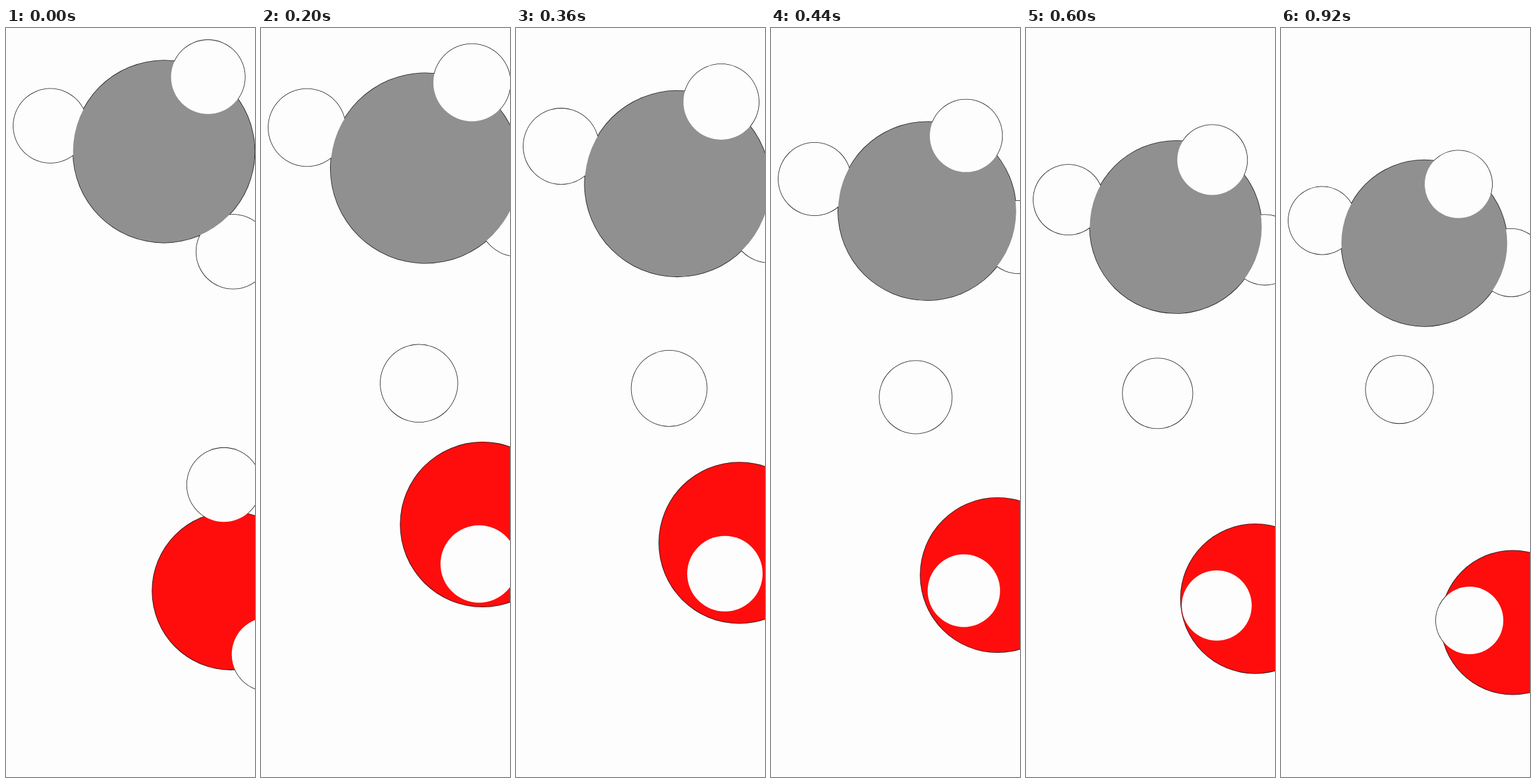
Recreate the animation shown at these times as an HTML page. Size 400 px wide and 1200 px high, loop 960 ms.

```html
<!DOCTYPE html>
<html lang="en">
<head>
<meta charset="utf-8">
<title>Drifting circles</title>
<style>
  html, body { margin: 0; width: 100%; height: 100%; overflow: hidden; background: #fdfdfd; }
  svg { display: block; width: 100%; height: 100%; }
</style>
</head>
<body>
<svg viewBox="0 0 400 1200"><g id="rims"></g><g id="discs"></g></svg>
<script>
const LOOP = 960, STEP = 40, LINE = 0.8;
const WHITE = '#fdfdfd', GREY = '#909090', RED = '#ff0d0d', INK = '#111';

// The whole group is zoomed to span these two edges; the right one is off stage.
const LEFT = 11.5, RIGHT = 488;
const GREY_SIZE = 2.449, RED_SIZE = 2.121;

const easeIn = u => u ** 2.5;
const easeOut = u => 1 - (1 - u) ** 1.7;

// Approach, slow release, drift to rest.
const phases = [
  { from: 0, to: 200, ease: easeOut },
  { from: 200, to: 440, ease: easeIn },
  { from: 440, to: 920, ease: easeOut }
];

// Centres at the four phase ends.
const red = {
  fill: RED, size: RED_SIZE,
  x: [361.3, 355.8, 363.8, 372.3], y: [901.8, 795.4, 876.5, 952.5]
};
const leftmost = { fill: WHITE, size: 1, y: [156.7, 159.5, 242, 308.5] };

// Back to front.
const circles = [
  leftmost,
  { fill: WHITE, size: 1, x: [365, 412, 398, 369.5], y: [358.4, 304, 335, 376] },
  { fill: GREY, size: GREY_SIZE, x: [253.6, 264, 250.8, 230.2], y: [198, 224.5, 293.3, 344.7] },
  { fill: WHITE, size: 1, x: [324.5, 338.8, 313.3, 285], y: [78.5, 87.5, 172.7, 250.4] },
  red,
  { fill: WHITE, size: 1, x: [350, 253.8, 232.4, 190.3], y: [732, 569.3, 591.5, 579.2] },
  { fill: WHITE, size: 1, x: [422, 350.3, 309.8, 303], y: [1003.5, 858.7, 901.5, 949.2] }
];

function addCircle(groupId, fill) {
  const node = document.createElementNS('http://www.w3.org/2000/svg', 'circle');
  node.setAttribute('fill', fill);
  return document.getElementById(groupId).appendChild(node);
}

function place(node, x, y, r) {
  node.setAttribute('cx', x);
  node.setAttribute('cy', y);
  node.setAttribute('r', r);
}

// Rims lie below every disc, so lines show only around the merged shape.
for (const c of circles) {
  c.rim = addCircle('rims', INK);
  c.disc = addCircle('discs', c.fill);
}

function draw(now) {
  const t = Math.floor((now % LOOP) / STEP) * STEP;
  const i = phases.findIndex(p => t <= p.to);
  const { from, to, ease } = phases[i];
  const part = ease((t - from) / (to - from));
  const mix = track => track[i] + (track[i + 1] - track[i]) * part;

  const unit = (RIGHT - mix(red.x)) / RED_SIZE;
  for (const c of circles) {
    const x = c === leftmost ? LEFT + unit : mix(c.x);
    const y = mix(c.y), r = unit * c.size;
    place(c.rim, x, y, r + LINE / 2);
    place(c.disc, x, y, r - LINE / 2);
  }
}

const start = performance.now();
function tick() {
  draw(performance.now() - start);
  requestAnimationFrame(tick);
}
tick();
</script>
</body>
</html>
```
